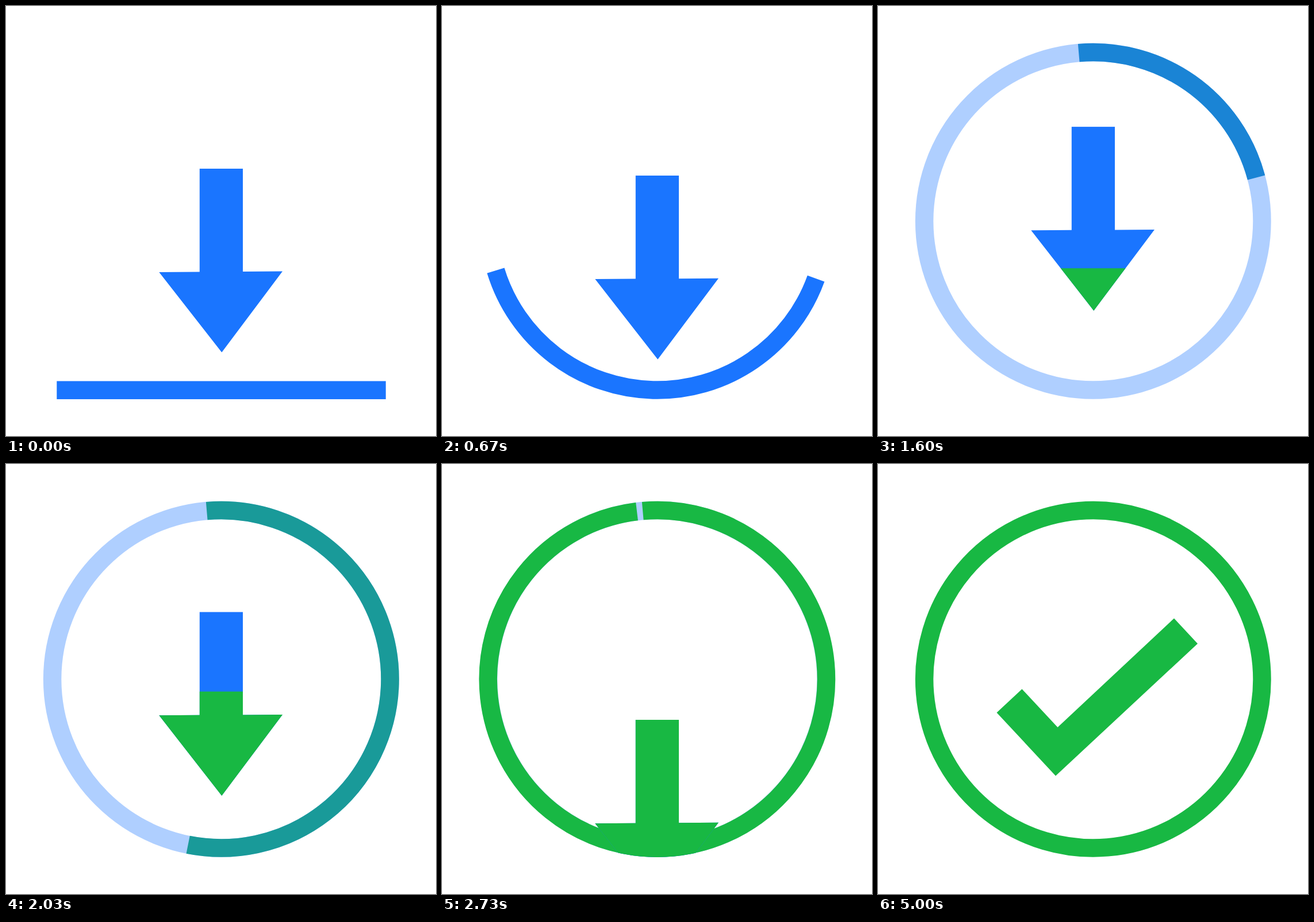
Write an HTML page that moves like this. It is 748x748 px and loops after 5.03 s.

```html
<!DOCTYPE html>
<html lang="en">
<head>
<meta charset="utf-8">
<title>Download</title>
<style>
  html, body { margin: 0; width: 100%; height: 100%; overflow: hidden; background: #fff; }
  svg { display: block; width: 100vw; height: 100vh; }
</style>
</head>
<body>
<svg viewBox="0 0 748 748">
  <defs>
    <clipPath id="disc"><circle cx="374.3" cy="374.3" r="309.7"/></clipPath>
    <clipPath id="shape"><path d="M336.8 0H412V179.3L481 178.8L375.3 319.8L266.3 180.2L336.8 179.7Z"/></clipPath>
    <mask id="reveal" maskUnits="userSpaceOnUse" x="0" y="0" width="748" height="748">
      <path id="wipe" d="M225 408.2L310.5 500L539 287.3" fill="none" stroke="#fff" stroke-width="76" stroke-miterlimit="8"/>
    </mask>
  </defs>
  <g fill="none" stroke="#1a75ff" stroke-width="31.5">
    <circle id="track" cx="374.3" cy="374.3" r="293.7"/>
    <path id="line"/>
    <path id="bar"/>
  </g>
  <g id="drop" clip-path="url(#disc)">
    <g id="arrow">
      <g clip-path="url(#shape)">
        <rect x="260" width="230" height="321" fill="#1a75ff"/>
        <rect id="fill" x="260" width="230" fill="#18b843"/>
      </g>
    </g>
  </g>
  <path id="check" d="M206.5 432.5L250.5 391.5L312.5 458L515 268.5L556 312.5L309 542.5Z" fill="#18b843" mask="url(#reveal)"/>
</svg>
<script>
const LOOP = 5030, STEP = 100 / 3, C = 374.3, R = 293.7;
const BLUE = [26, 117, 255], GREEN = [24, 184, 67];
const $ = id => document.getElementById(id);
const set = (id, attrs) => {
  for (const k in attrs) $(id).setAttribute(k, attrs[k]);
};
const show = (id, on) => set(id, { display: on ? "inline" : "none" });
const ramp = (t, a, b) => Math.min(1, Math.max(0, (t - a) / (b - a)));
const smooth = u => u * u * (3 - 2 * u);
const mix = u => `rgb(${BLUE.map((v, i) => Math.round(v + (GREEN[i] - v) * u))})`;

// Clockwise arc; angles in degrees from twelve o'clock
function arc(cy, r, from, to) {
  const at = deg => {
    const a = deg * Math.PI / 180;
    return `${(C + r * Math.sin(a)).toFixed(2)} ${(cy - r * Math.cos(a)).toFixed(2)}`;
  };
  const mid = (from + to) / 2;
  return `M${at(from)}A${r} ${r} 0 0 1 ${at(mid)}A${r} ${r} 0 0 1 ${at(to)}`;
}

const hops = [[-70, 295], [295, 156], [664, 295], [1010, 156], [1387, 295], [1760, 156], [2175, 295], [2400, 230]];

function arrowTop(t) {
  const i = hops.findIndex(h => h[0] > t);
  if (i < 0) return 230 + 215 * ((t - 2400) / 330) ** 2;
  const [t0, y0] = hops[i - 1], [t1, y1] = hops[i];
  return y0 + (y1 - y0) * (1 - Math.cos(Math.PI * (t - t0) / (t1 - t0))) / 2;
}

// The straight line bends into an arc, then runs round the ring
function linePath(t) {
  const bend = smooth(ramp(t, 0, 560));
  if (bend < 0.002) return "M88.3 668.3H660.7";
  if (t < 570) {
    const r = R / bend;
    const half = (286 + 88 * bend ** 3) / r * 180 / Math.PI;
    return arc(C + R - r, r, 180 - half, 180 + half);
  }
  const tail = 107 + 212.8 * ((t - 570) / 560) ** 2.5;
  const head = 253 + 99.8 * ramp(t, 670, 1030) ** 2;
  return tail < head ? arc(C, R, tail, head) : "";
}

function draw(t) {
  set("line", { d: linePath(t) });
  set("track", { opacity: 0.35 * ramp(t, 700, 1000) });

  const u = ramp(t, 1200, 2744);
  const done = 0.6 * u + 0.4 * smooth(u);
  show("bar", done > 0);
  set("bar", { d: arc(C, R, -4.9, -4.9 + 360 * done), stroke: mix(done) });
  show("track", done < 1);

  const top = arrowTop(t), level = 320 * Math.min(1, done * 1.04);
  show("drop", top < 690);
  set("arrow", { transform: `translate(0 ${top.toFixed(2)})` });
  set("fill", { y: 320 - level, height: level ? level + 1 : 0 });

  const tick = ramp(t, 2880, 3300) ** 2;
  const len = $("wipe").getTotalLength();
  show("check", tick > 0);
  set("wipe", { "stroke-dasharray": `${len * tick + (tick === 1 ? 5 : 0)} 1000` });
}

// Thirty pictures a second, each starting on a multiple of 10 ms
const hold = t => Math.round(Math.floor((t + 4) / STEP) * STEP / 10) * 10;

const start = performance.now();
function frame() {
  draw(hold((performance.now() - start) % LOOP));
  requestAnimationFrame(frame);
}
draw(0);
requestAnimationFrame(frame);
</script>
</body>
</html>
```
